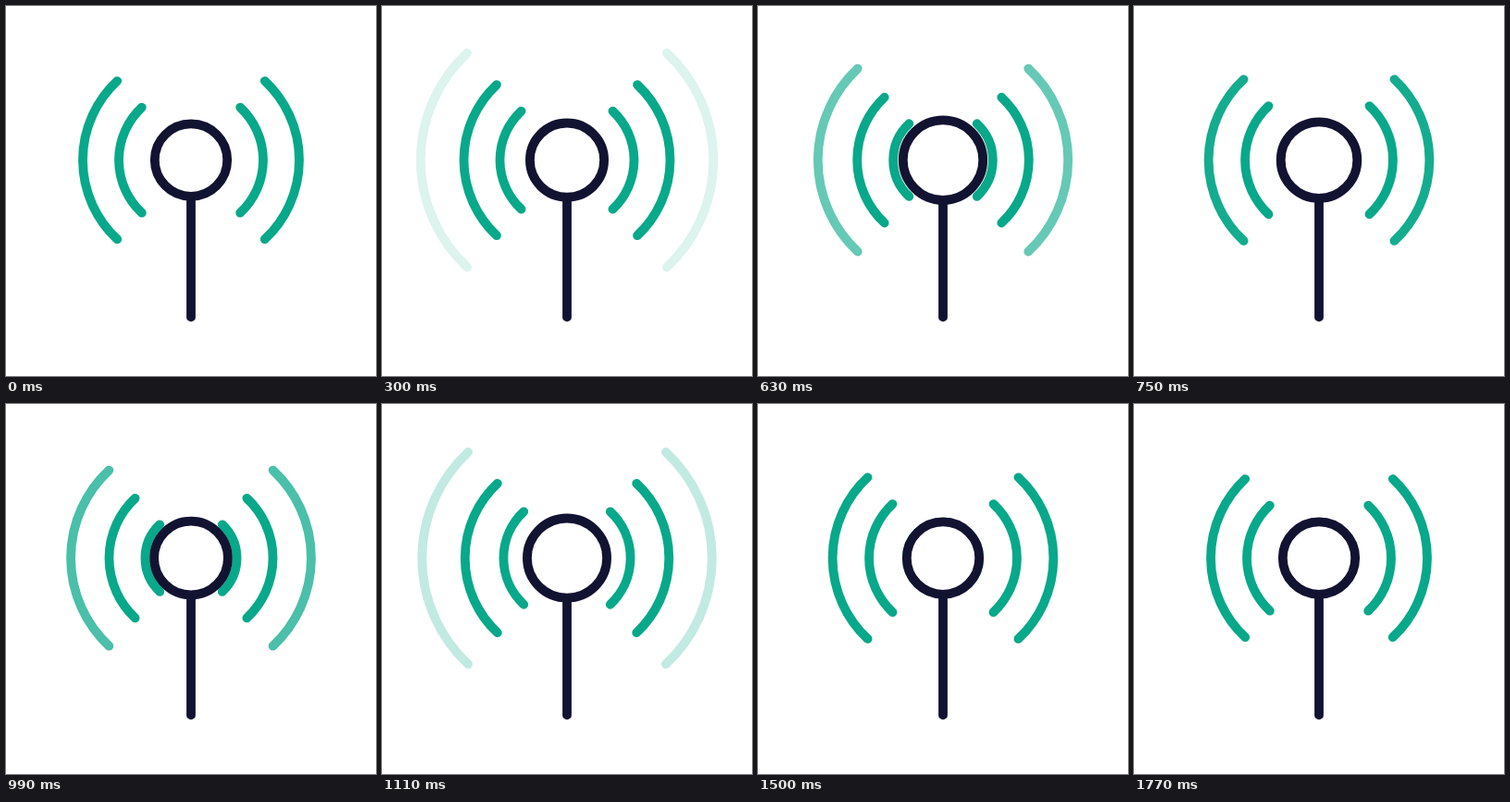
Recreate the animation shown at these times as an HTML page. Size 400 by 400 pixels, loop 5030 ms.

```html
<!DOCTYPE html>
<html lang="en">
<head>
<meta charset="utf-8">
<title>Incoming signal</title>
<style>
  html, body { margin: 0; width: 100%; height: 100%; overflow: hidden; background: #fff; }
  svg { display: block; width: 100%; height: 100%; }
  path, circle { stroke-width: 9.8; stroke-linecap: round; fill: none; }
  .wave { stroke: #08a88a; }
  .mast { stroke: #121331; }
  #ball { fill: #fff; }
</style>
</head>
<body>
<svg viewBox="0 0 400 400">
  <g id="waves"></g>
  <path id="pole" class="mast"/>
  <circle id="ball" class="mast" cx="200" cy="166.6"/>
</svg>
<script>
const LOOP = 5030, STEP = 30, LAST = 59;
const CX = 200, CY = 166.6, FOOT = 336.4;
const ANGLE = 47 * Math.PI / 180;
const RADII = [165, 117, 78, 39];   // stages a wave passes on its way in
const STARTS = [2, 1, 0, -1, -2];   // stage of each wave when the loop begins

// Keys are [step, value]
const travel = curve([[0, 0], [10, .141], [16, .308], [25, .95], [33, 1.73],
                      [43, 2.72], [50, 2.95], [54, 2.99], [59, 3]]);
const ballSize = curve([[0, 39.2], [7, 39.3], [10, 40.1], [17, 44.4], [25, 41.3], [30, 39.4],
                        [33, 39.9], [38, 43.4], [43, 41.1], [50, 39.2], [59, 39.2]]);

// Smooth curve through the keys without overshoot
function curve(keys) {
  const slope = keys.slice(1).map((k, i) => (k[1] - keys[i][1]) / (k[0] - keys[i][0]));
  const tangent = keys.map((_, i) => {
    const a = slope[i - 1], b = slope[i];
    return a * b > 0 ? 2 * a * b / (a + b) : 0;
  });
  return x => {
    let i = 0;
    while (i < keys.length - 2 && x > keys[i + 1][0]) i++;
    const [x0, y0] = keys[i], [x1, y1] = keys[i + 1];
    const w = x1 - x0, u = (x - x0) / w, v = 1 - u;
    return y0 * v * v * (1 + 2 * u) + y1 * u * u * (3 - 2 * u)
         + w * u * v * (tangent[i] * v - tangent[i + 1] * u);
  };
}

const byId = id => document.getElementById(id);
const waves = STARTS.map(() => {
  const path = document.createElementNS("http://www.w3.org/2000/svg", "path");
  path.setAttribute("class", "wave");
  return byId("waves").appendChild(path);
});

function arcPair(r) {
  const x = r * Math.cos(ANGLE), y = r * Math.sin(ANGLE);
  const side = (dir, sweep) =>
    `M${CX + dir * x} ${CY - y}A${r} ${r} 0 0 ${sweep} ${CX + dir * x} ${CY + y}`;
  return side(-1, 0) + side(1, 1);
}

function drawWave(path, stage, hurry) {
  const shown = stage > 0 && stage < 3;
  path.style.display = shown ? "" : "none";
  if (!shown) return;
  const i = Math.floor(stage);
  let part = stage - i;
  if (i === 2) part = Math.min(1, part * hurry);
  path.setAttribute("d", arcPair(RADII[i] + (RADII[i + 1] - RADII[i]) * part));
  path.setAttribute("stroke-opacity", Math.min(1, stage * hurry));
}

function draw(time) {
  const step = Math.min(LAST, Math.floor(time % LOOP / STEP));
  const moved = travel(step);
  const size = ballSize(step);
  // The last wave fades in sooner, and the one before the ball is swallowed sooner
  const hurry = moved > 2 && moved < 3 ? 1.4 : 1;
  waves.forEach((path, i) => {
    const stage = STARTS[i] + moved;
    drawWave(path, stage, stage === moved || STARTS[i] === -2 ? hurry : 1);
  });
  byId("ball").setAttribute("r", size);
  byId("pole").setAttribute("d", `M${CX} ${CY + size}V${FOOT}`);
}

const start = performance.now();
function tick() {
  draw(performance.now() - start);
  requestAnimationFrame(tick);
}
tick();
</script>
</body>
</html>
```
